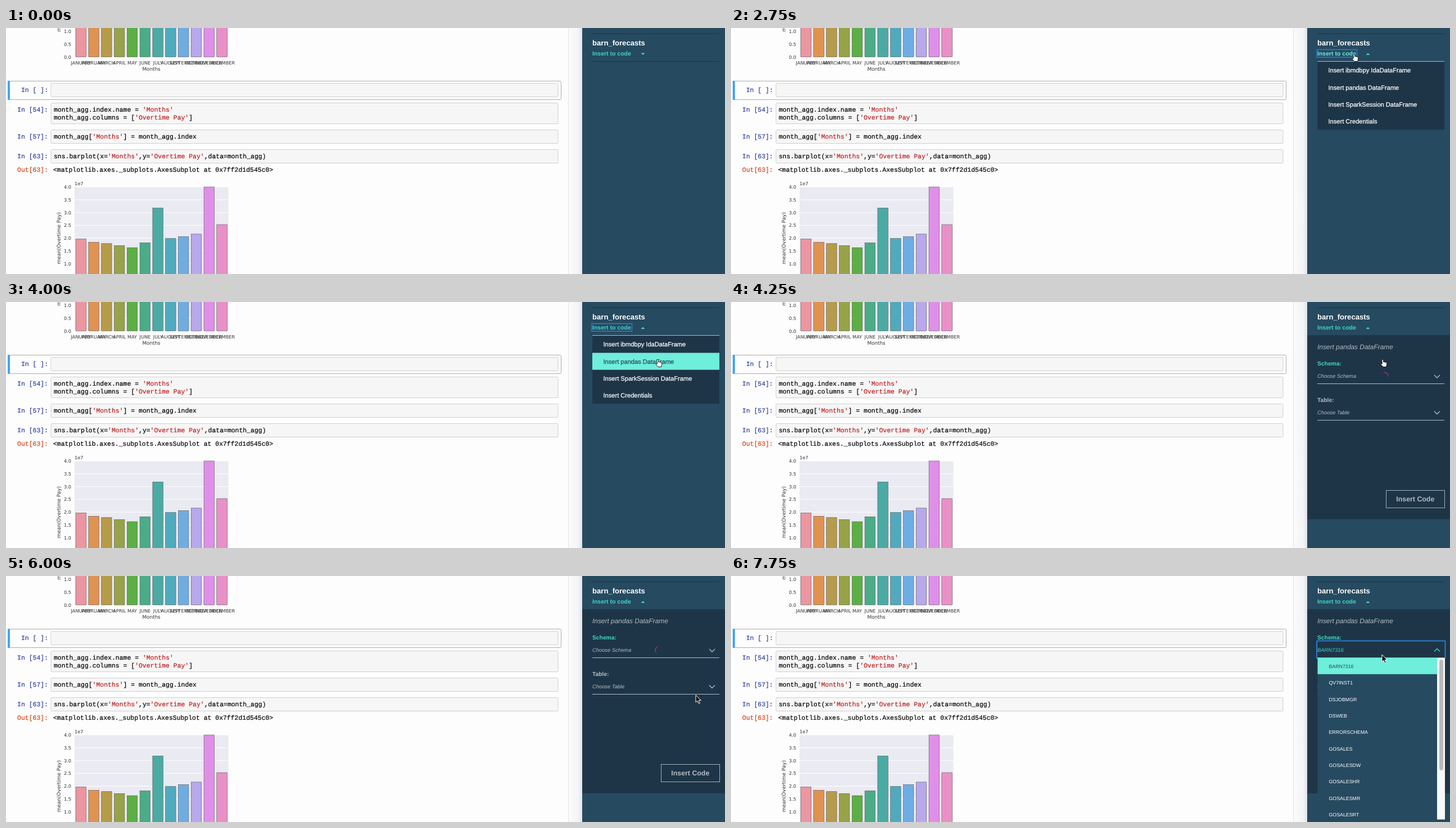
Animation of 1279x438 px, one loop 8 s. Source, as an HTML page:

```html
<!DOCTYPE html>
<html lang="en">
<head>
<meta charset="utf-8">
<title>Notebook: insert to code</title>
<style>
  html, body { margin: 0; width: 100%; height: 100%; overflow: hidden; background: #fdfdfd; }
  svg { display: block; width: 100%; height: 100%; }
  text { white-space: pre; text-rendering: geometricPrecision; font-family: "Liberation Sans", Arial, sans-serif; }
  .code { font: 11.45px "Liberation Mono", "Courier New", monospace; stroke: currentColor; stroke-width: .2; fill: currentColor; }
  .plot { font-family: "DejaVu Sans", sans-serif; fill: #333; }
  .bold { font-weight: bold; }
  .ital { font-style: italic; }
  .mid { text-anchor: middle; }
  .end { text-anchor: end; }
  .item { stroke: currentColor; stroke-width: .25; fill: currentColor; }
</style>
</head>
<body>
<svg id="stage" viewBox="0 0 1279 438" preserveAspectRatio="none">
  <defs>
    <linearGradient id="edge">
      <stop offset="0" stop-color="#fafafb"/>
      <stop offset=".7" stop-color="#f5f5f8"/>
      <stop offset="1" stop-color="#dfe2e8"/>
    </linearGradient>
  </defs>
</svg>
<script>
const stage = document.getElementById('stage');
const TEAL = '#41d6c3', BRIGHT = '#6eeedb', NAVY = '#1e3548', SIDE = '#264a60', GREY = '#b4bcc3', BLUE = '#2c7cc9';

function add(parent, tag, attrs = {}, content) {
  const el = document.createElementNS('http://www.w3.org/2000/svg', tag);
  for (const key in attrs) el.setAttribute(key, attrs[key]);
  if (content !== undefined) el.textContent = content;
  return parent.appendChild(el);
}
const group = (parent = stage) => add(parent, 'g');
const rect = (p, x, y, x2, y2, fill, more) =>
  add(p, 'rect', { x, y, width: x2 - x, height: y2 - y, fill, ...more });
const frame = (p, x, y, x2, y2, stroke, width = 1, more) =>
  rect(p, x, y, x2, y2, 'none', { stroke, 'stroke-width': width, ...more });
const line = (p, y, stroke) => add(p, 'path', { d: `M1043 ${y}H1269`, stroke });
const label = (p, x, y, str, size, fill, cls = '') =>
  add(p, 'text', { x, y, 'font-size': size, fill, class: cls }, str);
const chevron = (p, y, dir, stroke) =>
  add(p, 'path', { d: `M1251 ${y - 2.5 * dir}l5 ${5 * dir}l5 ${-5 * dir}`, fill: 'none', stroke, 'stroke-width': 1.4 });
const show = (el, on) => el.setAttribute('visibility', on ? 'inherit' : 'hidden');

// Bar charts
const HUES = ['#eb96a1', '#e09250', '#b69b4b', '#98a248', '#5caf44', '#4aad87',
  '#4caaa4', '#50aabe', '#6eade4', '#b8a8ec', '#e08fe8', '#e991c6'];
const PAY = [1.97, 1.84, 1.79, 1.71, 1.63, 1.82, 3.18, 1.99, 2.06, 2.16, 4, 2.53];
const MONTHS = ['JANUARY', 'FEBRUARY', 'MARCH', 'APRIL', 'MAY', 'JUNE', 'JULY', 'AUGUST',
  'SEPTEMBER', 'OCTOBER', 'NOVEMBER', 'DECEMBER'];

function chart(base) {
  const g = group(), unit = 45.6, pitch = 22.8, top = base - 4 * unit;
  rect(g, 122, top, 395.5, base, '#eaeaf2');
  for (let v = 0; v <= 4; v += .5) {
    const y = base - v * unit;
    add(g, 'path', { d: `M122 ${y}H395.5`, stroke: '#fff' });
    label(g, 116, y + 3, v.toFixed(1), 8.2, '#333', 'plot end');
  }
  PAY.forEach((v, i) => {
    const x = 122 + i * pitch;
    rect(g, x + 2.1, base - v * unit, x + 20.5, base, HUES[i], { stroke: '#555', 'stroke-width': .6 });
    label(g, x + pitch / 2, base + 13, MONTHS[i], 8.2, '#333', 'plot mid');
  });
  label(g, 122, top - 3, '1e7', 8.2, '#333', 'plot');
  label(g, 258.5, base + 24.5, 'Months', 8.8, '#333', 'plot mid');
  add(g, 'text', { transform: `translate(96.5 ${(top + base) / 2}) rotate(-90)`, 'font-size': 8.95, class: 'plot mid' },
    'mean(Overtime Pay)');
}

// Notebook
function code(x, y, str, color = '#000', cls = '') {
  const el = add(stage, 'text', { x, y, class: 'code ' + cls, color });
  for (const part of str.split(/('[^']*')/))
    add(el, 'tspan', part[0] === "'" ? { color: '#c01c1c' } : {}, part);
}
function cell(n, y, y2, lines = []) {
  frame(stage, 80, y, 982, y2, '#cfcfcf', 1, { rx: 2, fill: '#f6f6f7' });
  code(75, y + 15.7, `In [${n}]:`, '#303f9f', 'end');
  lines.forEach((str, i) => code(85, y + 15.7 + i * 13.8, str));
}
rect(stage, 0, 0, 1279, 438, '#fdfdfd');
rect(stage, 1001, 0, 1025, 438, 'url(#edge)');
rect(stage, 1000, 0, 1001, 438, '#e3e3e5');
chart(51.5);
chart(465.4);
frame(stage, 3.5, 94.5, 987.5, 127.5, '#ababab', 1, { rx: 2 });
rect(stage, 3, 94, 7, 128, '#42a5f5');
cell(' ', 98.5, 122.5);
cell('54', 133.5, 170.5, ["month_agg.index.name = 'Months'", "month_agg.columns = ['Overtime Pay']"]);
cell('57', 181.5, 205.5, ["month_agg['Months'] = month_agg.index"]);
cell('63', 216.5, 240.5, ["sns.barplot(x='Months',y='Overtime Pay',data=month_agg)"]);
code(75, 255.5, 'Out[63]:', '#d84315', 'end');
code(84, 255.5, '<matplotlib.axes._subplots.AxesSubplot at 0x7ff2d1d545c0>');

// Sidebar
rect(stage, 1025, 0, 1279, 438, SIDE);
line(stage, 10, '#1b3346');
const divider = line(stage, 59.5, '#1b3346');
const panel = group();
rect(panel, 1025, 59, 1279, 387, NAVY);
label(stage, 1043, 31, 'barn_forecasts', 13.1, '#fff', 'bold');
const link = label(stage, 1043, 49.3, 'Insert to code', 10.5, TEAL, 'bold');
const caret = add(stage, 'path', { fill: TEAL });
const ring = frame(stage, 1042, 38.5, 1113.5, 52, BLUE, 1.6);

// Action menu
const menu = group();
rect(menu, 1043, 60, 1269, 181, NAVY);
line(menu, 59.5, '#7fd0cb');
const rows = ['Insert ibmdbpy IdaDataFrame', 'Insert pandas DataFrame', 'Insert SparkSession DataFrame', 'Insert Credentials']
  .map((str, i) => {
    const y = 60.3 + i * 30.2, back = rect(menu, 1043, y, 1269, y + 30.2, BRIGHT);
    return { back, text: label(menu, 1062.5, y + 19.1, str, 11.1, '', 'item') };
  });

// Data frame form
label(panel, 1043, 84, 'Insert pandas DataFrame', 11.9, GREY, 'ital');
label(panel, 1043, 113, 'Schema:', 10.3, TEAL, 'bold');
const choice = label(panel, 1043, 135.3, '', 9.35, GREY, 'ital');
const rule = line(panel, 145.5, GREY);
const arrowDown = chevron(panel, 132.5, 1, GREY);
label(panel, 1043, 177.7, 'Table:', 10.3, GREY, 'bold');
label(panel, 1043, 199.8, 'Choose Table', 9.35, GREY, 'ital');
line(panel, 210.5, GREY);
chevron(panel, 197, 1, GREY);
frame(panel, 1165.5, 335.5, 1269.5, 366.5, '#a5aeb5');
label(panel, 1217.3, 355.3, 'Insert Code', 12.35, GREY, 'bold mid');
const spinner = group(panel);
add(spinner, 'path', { d: 'M0-7A7 7 0 0 1 7 0', fill: 'none', stroke: '#a02f80', 'stroke-width': 1.6 });
add(spinner, 'path', { d: 'M-4.5-5.4A7 7 0 0 1 0-7M7 0A7 7 0 0 1 5.4 4.5', fill: 'none', stroke: '#a02f80', 'stroke-opacity': .35 });

// Schema list
const list = group(panel);
frame(list, 1042, 115.5, 1270.5, 147, BLUE, 2, { rx: 1 });
chevron(list, 132, -1, TEAL);
rect(list, 1043.5, 146, 1256, 433.5, SIDE);
rect(list, 1256, 146, 1270, 433.5, '#f8f8f8');
rect(list, 1260, 149, 1267, 346, '#b9b9b9', { rx: 3.5 });
rect(list, 1043.5, 146, 1256, 174.8, BRIGHT);
['BARN7316', 'QV7INST1', 'DSJOBMGR', 'DSWEB', 'ERRORSCHEMA', 'GOSALES', 'GOSALESDW', 'GOSALESHR', 'GOSALESMR', 'GOSALESRT']
  .forEach((str, i) => label(list, 1063.5, 163.8 + i * 29.35, str, 8.8, i ? '#fff' : SIDE));

// Pointers, drawn with the hot spot at 0,0
const hand = add(stage, 'path', {
  d: 'M-1.3 1.2Q0-1 1.2 1.2L1.8 5Q3 4 4 5.2Q5.2 4.4 6 5.7Q7.6 5.2 7.8 7L7.2 11L6.5 13.5H1L-2.8 9.2Q-3.2 7.2-.6 8Z',
  fill: '#fff', stroke: '#111', 'stroke-width': .9 });
const arrow = add(stage, 'path', {
  d: 'M0 0V13L3 10.3L5.2 15.2L7.4 14.2L5.2 9.4H9.2Z', fill: '#111', stroke: '#fff', 'stroke-width': 1 });

// Pointer path: time, x, y
const PATH = [[750, 1109, 51], [1500, 1100, 49], [1750, 1100, 49], [2250, 1108, 46], [2750, 1108, 46], [3000, 1111, 49],
  [3250, 1128, 67], [3750, 1157, 98], [4000, 1159, 102], [4500, 1159, 102], [4750, 1161, 90], [5000, 1170, 96],
  [5500, 1221, 163], [5750, 1227, 204], [6000, 1227, 212], [6250, 1224, 209], [6750, 1168, 146], [7000, 1158, 140], [8000, 1158, 140]];

function pointer(t) {
  const i = Math.max(1, PATH.findIndex(p => p[0] >= t));
  const [t0, x0, y0] = PATH[i - 1], [t1, x1, y1] = PATH[i], k = (t - t0) / (t1 - t0);
  return [x0 + (x1 - x0) * k, y0 + (y1 - y0) * k];
}

function draw(t) {
  const [x, y] = pointer(t);
  const inMenu = t >= 2250 && t < 4250, inForm = t >= 4250;
  const loaded = t >= 6250, hover = t >= 6750, open = t >= 7250;
  show(divider, !inMenu && !inForm);
  show(menu, inMenu);
  show(ring, inMenu);
  show(panel, inForm);
  link.setAttribute('fill', t >= 750 && t < 3250 ? BRIGHT : TEAL);
  caret.setAttribute('d', inMenu || inForm ? 'M1129.5 48h7l-3.5-3.5z' : 'M1129.5 44.5h7l-3.5 3.5z');

  const active = Math.floor((y - 60.3) / 30.2);
  rows.forEach(({ back, text }, i) => {
    show(back, i === active);
    text.setAttribute('color', i === active ? SIDE : '#fff');
    text.setAttribute('stroke-width', i === active ? 0 : .25);
  });

  choice.textContent = loaded ? 'BARN7316' : 'Choose Schema';
  choice.setAttribute('fill', hover ? TEAL : GREY);
  rule.setAttribute('stroke', hover ? TEAL : GREY);
  arrowDown.setAttribute('stroke', hover ? TEAL : GREY);
  show(arrowDown, !open);
  show(list, open);
  show(spinner, !loaded);
  spinner.setAttribute('transform', `translate(1162 132.3) rotate(${(t - 4250) * .343})`);

  const isHand = t >= 750 && t < 4750;
  show(hand, isHand);
  show(arrow, t >= 4750);
  (isHand ? hand : arrow).setAttribute('transform', `translate(${x} ${y})`);
}

const STEP = 250, LOOP = 8000;
const start = performance.now();
function tick(now) {
  const t = Math.max(0, now - start) % LOOP;
  draw(Math.floor(t / STEP) * STEP);
  requestAnimationFrame(tick);
}
draw(0);
requestAnimationFrame(tick);
</script>
</body>
</html>
```
